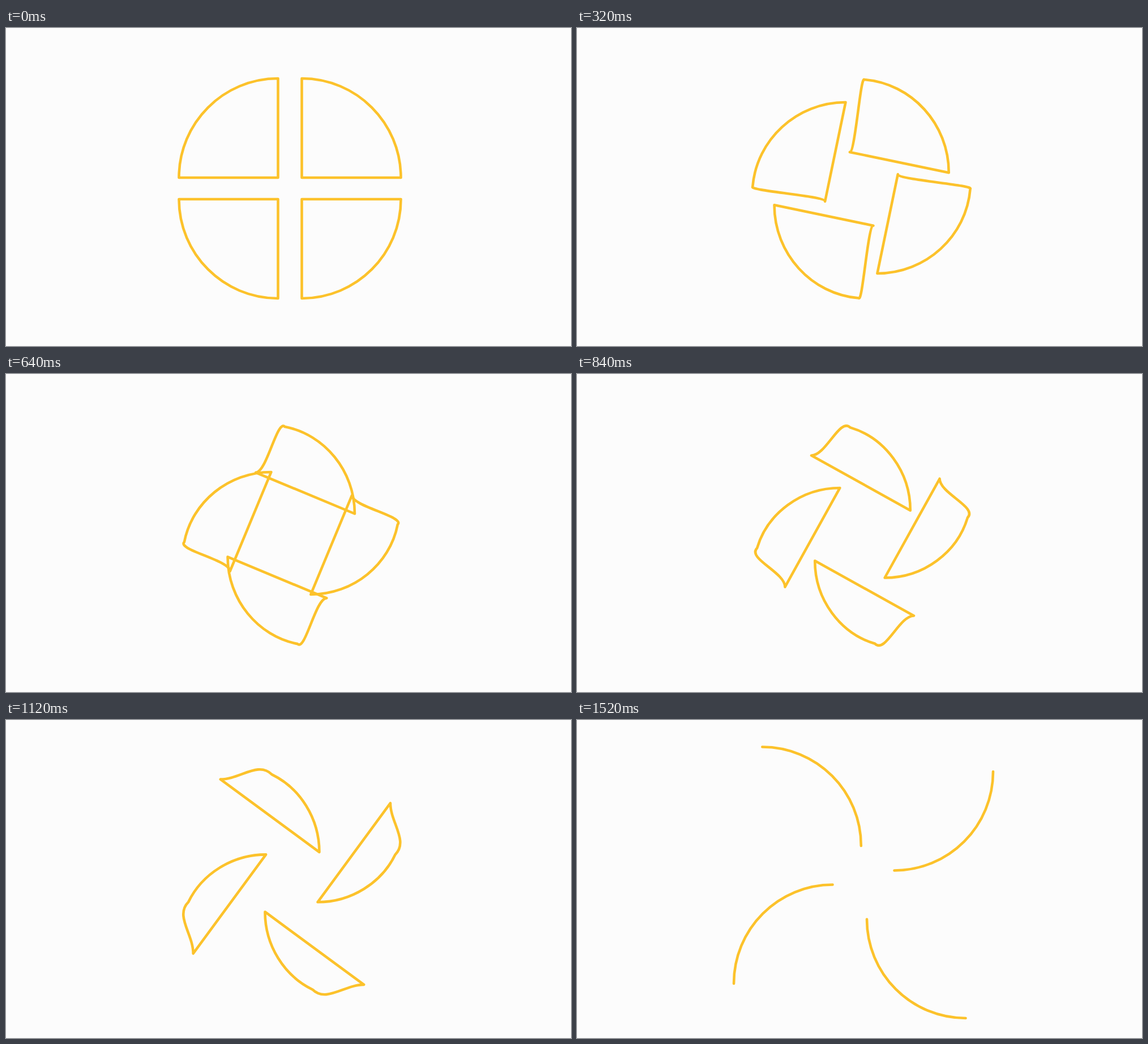
These frames come from a looping animation (998 px wide and 561 px high, 2 s). An HTML page:

```html
<!DOCTYPE html>
<html lang="en">
<head>
<meta charset="utf-8">
<title>Quarter circles to arcs</title>
<style>
  html, body { margin: 0; height: 100%; overflow: hidden; background: #fcfcfc; }
  svg { display: block; width: 100%; height: 100%; }
  path { fill: none; stroke: #fcc22b; stroke-width: 4.6; stroke-linejoin: round; stroke-linecap: round; }
</style>
</head>
<body>
<svg viewBox="0 0 998 561"><path/><path/><path/><path/></svg>
<script>
const LOOP = 2000, STEP = 40, STEPS = 38, TICKS = 72;

// Corner position at the start and the end, and the turn of each piece.
const pieces = [
  { from: [522.5, 264], to: [327.3, 47.5], turn: 0 },
  { from: [522.5, 302], to: [735, 91], turn: 90 },
  { from: [480.5, 302], to: [686.5, 526], turn: 180 },
  { from: [480.5, 264], to: [277, 465], turn: 270 }
];

// Around the corner at 0,0: corner -> tip -> end, as two cubic curves.
const S = 175, K = S * 0.5523;
const sector = [[0, 0], [0, -S], [0, -S], [K, -S], [S, -K], [S, 0]];

const R = 174.5, H = R * 0.2652, D = Math.SQRT1_2;
const mid = [R * D, R - R * D];
const arc = [
  [H, 0], [mid[0] - H * D, mid[1] - H * D], mid,
  [mid[0] + H * D, mid[1] + H * D], [R, R - H], [R, R]
];

const paths = document.querySelectorAll('path');
const mix = (a, b, p) => a.map((v, i) => v + (b[i] - v) * p);

function draw(time) {
  const step = Math.min(STEPS, Math.floor(time % LOOP / STEP));
  const p = Math.min(1, Math.round(step * 1.9) / TICKS);
  const points = sector.map((point, i) => mix(point, arc[i], p));
  // The straight side disappears once the arc is complete.
  const d = 'M0 0C' + points.join(' ') + (p < 1 ? 'Z' : '');
  pieces.forEach(({ from, to, turn }, i) => {
    paths[i].setAttribute('d', d);
    paths[i].setAttribute('transform', `translate(${mix(from, to, p)}) rotate(${turn})`);
  });
}

function tick() {
  draw(performance.now());
  requestAnimationFrame(tick);
}
tick();
</script>
</body>
</html>
```
